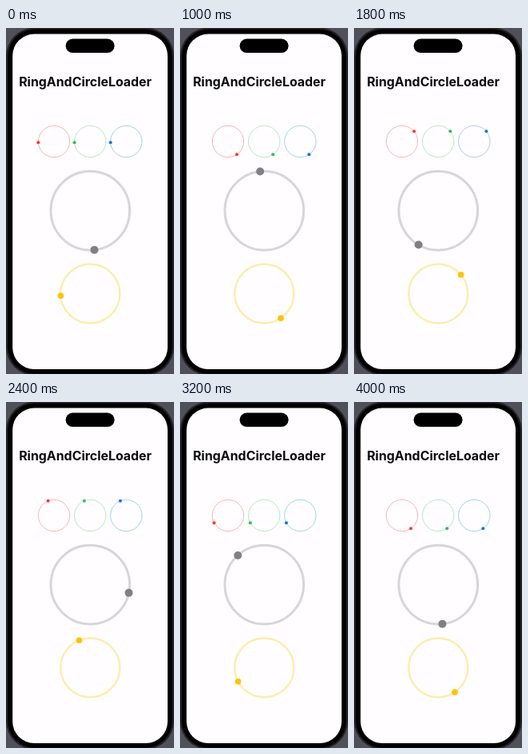
Recreate the animation shown at these times as an HTML page. Size 210 by 433 pixels, loop 4.1 s.

```html
<!DOCTYPE html>
<html lang="en">
<head>
<meta charset="utf-8">
<title>RingAndCircleLoader</title>
<style>
  html, body { margin: 0; width: 100%; height: 100%; overflow: hidden; background: #50505b; }
  svg { display: block; width: 210px; height: 433px; }
  text { font: 700 15.9px Inter, sans-serif; fill: #0a0a0c; }
</style>
</head>
<body>
<svg id="stage" viewBox="0 0 210 433">
  <rect y="-0.5" width="210" height="435.5" rx="36" fill="#222226"/>
  <rect x="2.3" y="1.8" width="205.4" height="431" rx="33.5"/>
  <rect x="8.2" y="7.6" width="193.8" height="419.4" rx="27" fill="#fffdff"/>
  <rect x="74.6" y="13.6" width="61" height="17.4" rx="8.7"/>
  <text x="16.2" y="73">RingAndCircleLoader</text>
</svg>
<script>
const LOOP = 4100, STEP = 100;
const stage = document.getElementById('stage');

// start in degrees, speed in degrees per second (clockwise positive)
const slow = { start: 176, speed: -120 };
const fast = { start: 84, speed: -180 };
const small = { y: 142, r: 19.7, width: 1, dot: 2, ...slow };
const loaders = [
  { x: 60, ring: '#ffb3af', fill: '#f8382d', ...small },
  { x: 105.2, ring: '#b5eac4', fill: '#30bd55', ...small },
  { x: 150.3, ring: '#a3cffc', fill: '#0a72ee', ...small },
  { x: 105.3, y: 228.6, r: 49.3, width: 3, dot: 5, ring: '#d6d5db', fill: '#808084', ...fast },
  { x: 105.3, y: 332.5, r: 37, width: 2.4, dot: 3.8, ring: '#fcedac', fill: '#fcc30b', ...slow },
];

function circle(attrs) {
  const node = document.createElementNS(stage.namespaceURI, 'circle');
  for (const name in attrs) node.setAttribute(name, attrs[name]);
  return stage.appendChild(node);
}

for (const l of loaders) {
  circle({ cx: l.x, cy: l.y, r: l.r, fill: 'none', stroke: l.ring, 'stroke-width': l.width });
  l.node = circle({ r: l.dot, fill: l.fill });
}

function draw() {
  const time = Math.floor((performance.now() % LOOP) / STEP + 1e-6) * STEP / 1000;
  for (const l of loaders) {
    const angle = (l.start + l.speed * time) * Math.PI / 180;
    l.node.setAttribute('cx', l.x + l.r * Math.cos(angle));
    l.node.setAttribute('cy', l.y + l.r * Math.sin(angle));
  }
  requestAnimationFrame(draw);
}
draw();
</script>
</body>
</html>
```
